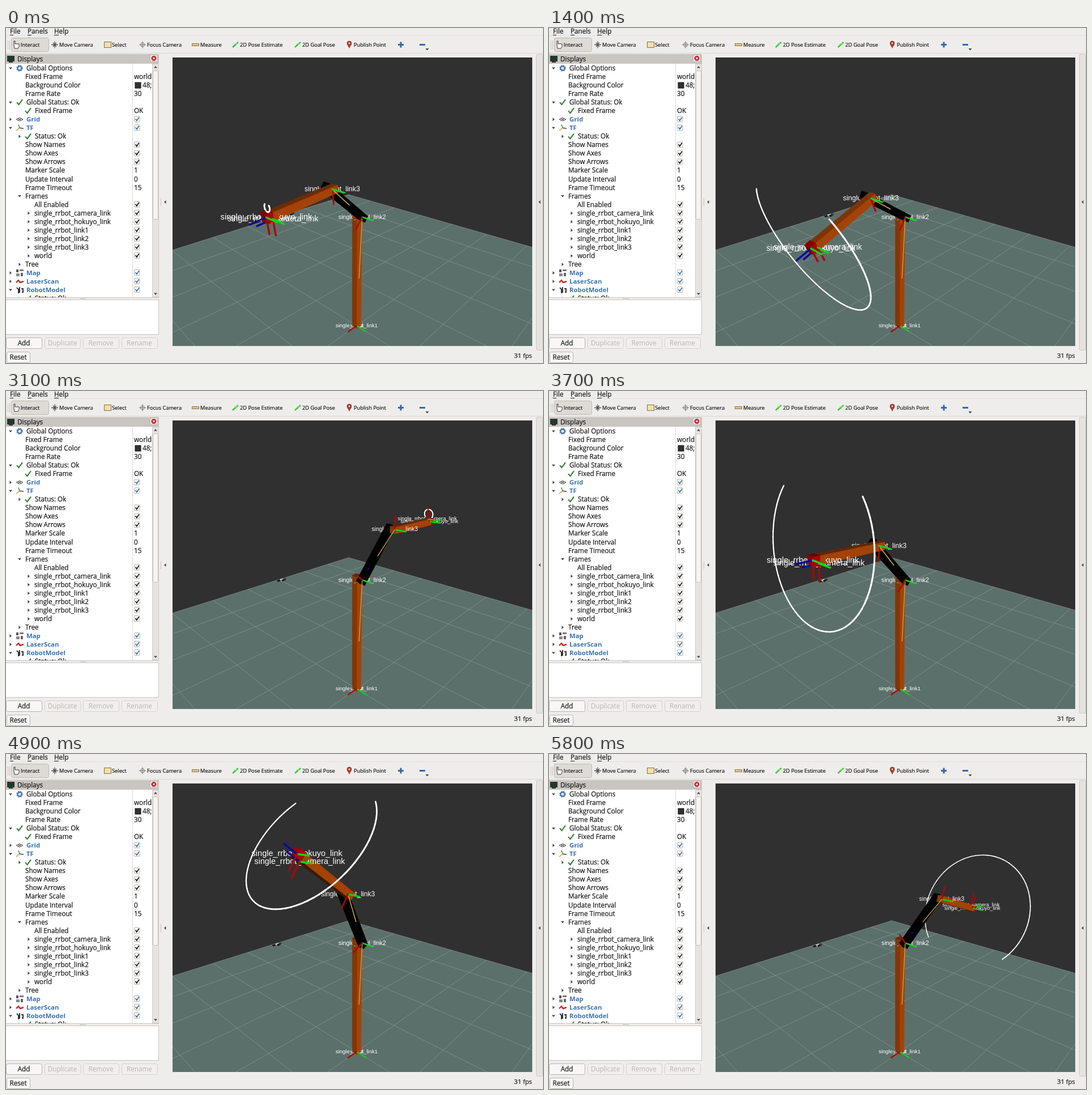
Write an HTML page with a canvas that moves like this. It is 948 px wide and 591 px high and loops after 5900 ms.

```html
<!DOCTYPE html>
<html lang="en">
<head>
<meta charset="utf-8">
<title>Robot arm view</title>
<style>
html, body { margin: 0; width: 100%; height: 100%; overflow: hidden; background: #efedeb; }
svg, canvas { position: absolute; display: block; }
svg { left: 0; top: 0; }
canvas { left: 294px; top: 52px; }
text { font-family: "Open Sans", "Noto Sans", sans-serif; font-size: 11.7px; fill: #141414; stroke: #141414; stroke-width: .2px; }
.tool { font-size: 9.3px; }
.name { font-size: 11.4px; font-weight: 700; fill: #3a74b4; stroke: none; }
.off { fill: #b9b5b0; stroke: none; }
</style>
</head>
<body>
<svg id="ui" width="948" height="591" viewBox="0 0 948 591"></svg>
<canvas id="view" width="635" height="509"></canvas>
<script>
// ---------- window chrome ----------
const text = (x, y, s, cls = '', extra = '') => `<text x="${x}" y="${y}" class="${cls}" ${extra}>${s}</text>`;
const rect = (x, y, w, h, fill, stroke = 'none', r = 0) =>
  `<rect x="${x}" y="${y}" width="${w}" height="${h}" rx="${r}" fill="${fill}" stroke="${stroke}"/>`;
const path = (d, stroke, w = 1.5, fill = 'none') =>
  `<path d="${d}" stroke="${stroke}" stroke-width="${w}" fill="${fill}"/>`;
const tri = (x, y, dir) => path({
  d: `M${x - 3} ${y - 1.5}h6l-3 3.5z`, r: `M${x - 1.5} ${y - 3}v6l3.5 -3z`,
  l: `M${x + 1.5} ${y - 3}v6l-3.5 -3z`, u: `M${x - 3} ${y + 1.5}h6l-3 -3.5z`
}[dir], 'none', 0, '#444');
const tick = (x, y) => path(`M${x - 5} ${y}l3.5 4l6.5 -9`, '#2c7d2c', 2);
const check = (y, blue) => rect(226.5, y - 5.5, 9.5, 10, '#fff', '#b5b0aa', 1.5) +
  path(`M228.5 ${y - 1}l2.3 3.2l4 -6`, blue ? '#3a74b4' : '#222', 1.8);

const icons = {
  'Global Options': y => `<circle cx="24" cy="${y}" r="3.6" fill="none" stroke="#4f7fb5" stroke-width="2.6"/>` +
    `<circle cx="24" cy="${y}" r="5" fill="none" stroke="#4f7fb5" stroke-width="1.5" stroke-dasharray="2 2"/>`,
  Grid: y => path(`M18 ${y}l6 -3l6 3l-6 3zM21 ${y - 1.5}l6 3M27 ${y - 1.5}l-6 3`, '#444', 1),
  TF: y => path(`M24 ${y}l-6 5`, '#c9a227') + path(`M24 ${y}l-2 -6`, '#3f8f3f') + path(`M24 ${y}l7 1`, '#445', 1.5),
  Map: y => rect(18, y - 6, 4, 5, '#555') + rect(24, y - 6, 7, 3, '#777') + rect(18, y + 1, 6, 5, '#888') + rect(26, y, 4, 6, '#666'),
  LaserScan: y => path(`M18 ${y + 2}l4 -4l3 4l6 -2`, '#c22', 2.4),
  RobotModel: y => path(`M19 ${y - 4}l3 3v7M24 ${y - 5}v10M27 ${y - 2}h3v6h-2`, '#333', 2)
};

// label, x, arrow, value ('c' and 'b' are check boxes, 't' a tick)
const link = n => ['single_rrbot_' + n, 50, 'r', 'c'];
const rows = [
  ['Global Options', 36, 'd'], ['Fixed Frame', 34, '', 'world'], ['Background Color', 34, '', '48;'],
  ['Frame Rate', 34, '', '30'], ['Global Status: Ok', 36, 'd', 't'], ['Fixed Frame', 51, '', 'OK'],
  ['Grid', 36, 'r', 'b'], ['TF', 36, 'd', 'b'], ['Status: Ok', 51, 'r', 't'],
  ['Show Names', 34, '', 'c'], ['Show Axes', 34, '', 'c'], ['Show Arrows', 34, '', 'c'],
  ['Marker Scale', 34, '', '1'], ['Update Interval', 34, '', '0'], ['Frame Timeout', 34, '', '15'],
  ['Frames', 34, 'd'], ['All Enabled', 50, '', 'c'],
  ...['camera_link', 'hokuyo_link', 'link1', 'link2', 'link3'].map(link), ['world', 50, 'r', 'c'],
  ['Tree', 34, 'r'], ['Map', 36, 'r', 'b'], ['LaserScan', 36, 'r', 'b'], ['RobotModel', 36, 'd', 'b'],
  ['Status: Ok', 51, 'r', 't']
];
const arrowX = { 34: 24, 36: 8, 50: 40, 51: 24 };

function row([label, x, arrow, val], i) {
  const y = 71 + i * 15.04, blue = val === 'b';
  let s = text(x, y + 4, label, blue ? 'name' : '');
  if (arrow) s += tri(arrowX[x], y, arrow);
  if (icons[label]) s += icons[label](y);
  if (val === 't' || val === 'OK') s += tick(x - 12, y);
  if (blue || val === 'c') s += check(y, blue);
  else if (val && val !== 't') {
    const swatch = val === '48;';
    if (swatch) s += rect(228, y - 5, 10, 10, '#303030', '#111');
    s += text(swatch ? 241 : 226, y + 4, val);
  }
  return s;
}

const button = (x, y, w, label, cls) => rect(x + .5, y + .5, w, 19, cls ? '#f1efed' : '#f8f7f6', cls ? '#d6d1cc' : '#b9b3ad', 3) +
  text(x + w / 2, y + 14, label, cls, 'text-anchor="middle"');
const pen = x => path(`M${x} 34l10 -9`, '#2fd02f', 2.5) + path(`M${x + 3} 28l6 0`, '#8be08b', 1.5);

document.getElementById('ui').innerHTML =
  rect(0, 0, 948, 591, '#efedeb') +
  text(7, 10, 'File') + text(38, 10, 'Panels') + text(85, 10, 'Help') +
  path('M7 12.5h6M38 12.5h7M85 12.5h8', '#222', 1) +
  path('M0 13.5h948', '#e2dfdb', 1) + path('M0 44.5h948', '#d8d4d0', 1) +
  path('M3.5 22v16M6.5 22v16', '#c5c0ba', 1) +
  rect(9.5, 17.5, 66, 24, '#dedbd7', '#bdb8b2', 3) +
  path('M14 30v-7h2v5h7v5l-2 3h-6z', '#333', 1, '#fff') +
  path('M80 29.5h12M86 23.5v12M83 26l6 7M89 26l-6 7', '#555', 1.3) +
  rect(173.5, 24.5, 12, 10, '#f1dfb0', '#8a6d3b') +
  path('M235 29.5h12M241 23.5v12', '#777', 1.2) + '<circle cx="241" cy="29.5" r="3.5" fill="none" stroke="#777"/>' +
  rect(328.5, 27.5, 12, 4, '#d9c58a', '#8a7a4a') +
  pen(400) + pen(510) +
  path('M606 35.5c-1 -4 -4 -5 -4 -8.5a4 4 0 0 1 8 0c0 3.5 -3 4.5 -4 8.5z', '#7d2018', .6, '#b03a2a') +
  '<circle cx="606" cy="27" r="1.4" fill="#efedeb"/>' +
  path('M692 29.5h10M697 24.5v10M730 29.5h10', '#3468b0', 3) + tri(743.5, 37.5, 'd') +
  [[26, 'Interact'], [94, 'Move Camera'], [187, 'Select'], [249, 'Focus Camera'], [343, 'Measure'],
   [413, '2D Pose Estimate'], [523, '2D Goal Pose'], [614, 'Publish Point']].map(([x, s]) => text(x, 33, s, 'tool')).join('') +
  rect(0, 46, 270, 17, '#c9c5c1') + rect(2.5, 49.5, 12, 9, '#1f3a2a', '#333') + rect(5, 59, 7, 2, '#333') + text(20, 59, 'Displays') +
  rect(254.5, 47.5, 13, 12, '#f3f0ee', '#b9a9a5', 3) + '<circle cx="261" cy="53.5" r="4.5" fill="#c8202a"/>' +
  path('M259.3 51.8l3.4 3.4M262.7 51.8l-3.4 3.4', '#fff', 1.2) +
  `<svg x="0" y="63" width="258" height="412" viewBox="0 63 258 412">${rect(0, 63, 258, 412, '#fff')}${path('M223.5 63v412', '#dcd9d6', 1)}${rows.map(row).join('')}</svg>` +
  rect(258.5, 63.5, 11, 411, '#e6e3e0', '#cfcac6') + rect(259.5, 75.5, 9, 262, '#f5f4f2', '#c4bfba', 2) +
  tri(264, 69, 'u') + tri(264, 469, 'd') + path('M0 475.5h270', '#c9c4bf', 1) +
  path('M130 477.5h11', '#bbb', 1) +
  rect(-.5, 479.5, 270, 61, '#fff', '#c9c4bf') +
  button(0, 546, 63, 'Add') + button(68, 546, 63, 'Duplicate', 'off') + button(136, 546, 63, 'Remove', 'off') + button(204, 546, 63, 'Rename', 'off') +
  button(1, 571, 41, 'Reset') + text(897, 582, '31 fps', '', 'style="font-size:11.2px"') +
  path('M273.5 300v14', '#c9c4bf', 1) + tri(281, 307, 'l') +
  rect(936.5, 46.5, 11, 522, '#e6e3df', '#cdc8c3', 2) + tri(942, 307, 'l');

// ---------- 3D view ----------
const g = document.getElementById('view').getContext('2d');
g.translate(-294, -52);
g.lineCap = 'round';
g.textAlign = 'center';
g.textBaseline = 'middle';

const CAM = [3.535, 3.243, 3.781], FOCAL = 614.4, COS = .9478, SIN = .319;
const HALF = 5.1, RAD = Math.PI / 180;
const LAG = .015; // the laser ring trails the arm, in s
const LIGHT = [.5, .7, .3];
const add = (a, b, k = 1) => a.map((v, i) => v + b[i] * k);
const dot = (a, b) => a[0] * b[0] + a[1] * b[1] + a[2] * b[2];

// world point -> [screen x, screen y, depth]
function project([x, y, z]) {
  const r = .07 - .6867 * x + .7269 * y, h = 4.797 - .7269 * x - .6867 * y, b = CAM[2] - z;
  const d = COS * h + SIN * b;
  return [611.5 + FOCAL * r / d, 306 + FOCAL * (COS * b - SIN * h) / d, d];
}

// time in s, swing phase of both joints in degrees
const swing = [[0, -301, -305], [1.4, 88, 72], [2.2, 319, 316], [3.1, 588, 598], [4.2, 919, 916], [4.9, 1107, 1109], [5.8, 1372, 1360]];
// time in s, radius of the laser ring in m
const ring = [[0, .05], [.1, .8], [.4, .92], [1.7, .9], [2, .7], [2.2, .13], [2.4, .9], [2.6, .9], [3.1, .08],
  [3.3, .7], [3.7, .9], [3.9, .9], [4.2, .18], [4.5, .9], [4.9, .86], [5.8, 1]];

function lerp(table, t, col = 1) {
  let i = 1;
  while (i < table.length - 1 && table[i][0] < t) i++;
  const a = table[i - 1], b = table[i];
  return a[col] + (b[col] - a[col]) * (t - a[0]) / (b[0] - a[0]);
}

const frame = (o, a) => ({ o, X: [Math.cos(a), 0, -Math.sin(a)], Y: [0, 1, 0], Z: [Math.sin(a), 0, Math.cos(a)] });
const at = (f, x, y, z) => add(add(add(f.o, f.X, x), f.Y, y), f.Z, z);

function pose(t) {
  const q = c => Math.sin(lerp(swing, t, c) * RAD);
  const l1 = frame([0, 0, 0], 0);
  const l2 = frame([0, .1, 1.95], q(1));
  const l3 = frame(at(l2, 0, .1, .9), q(1) + q(2));
  return { l1, l2, l3, camera: { ...l3, o: at(l3, .05, 0, .9) }, hokuyo: { ...l3, o: at(l3, 0, 0, .975) } };
}

let items;
const put = (depth, draw) => items.push({ depth, draw });

function poly(pts, fill, edge) {
  g.beginPath();
  pts.forEach(p => g.lineTo(p[0], p[1]));
  g.closePath();
  g.fillStyle = fill;
  g.fill();
  if (edge) { g.strokeStyle = fill; g.lineWidth = .6; g.stroke(); }
}

function line(a, b, color, width, bias = 0) {
  const p = project(a), q = project(b);
  put((p[2] + q[2]) / 2 - bias, () => {
    g.strokeStyle = color;
    g.lineWidth = width / p[2];
    g.beginPath();
    g.moveTo(p[0], p[1]);
    g.lineTo(q[0], q[1]);
    g.stroke();
  });
}

// box cut into slices along z, so that sorting by depth is enough
function box(f, z0, z1, half, rgb, n) {
  const step = (z1 - z0) / n;
  for (let i = 0; i < n; i++) {
    const a = z0 + i * step, b = a + step, m = (a + b) / 2;
    const sides = [[1, 0], [-1, 0], [0, 1], [0, -1]].map(([x, y]) => ({
      n: add(f.X.map(v => v * x), f.Y, y),
      c: at(f, x * half, y * half, m),
      p: [[1, a], [-1, a], [-1, b], [1, b]].map(([s, z]) => at(f, (x + s * y) * half, (y + s * x) * half, z))
    }));
    const cap = (z, k) => ({
      n: f.Z.map(v => v * k), c: at(f, 0, 0, z),
      p: [[1, 1], [1, -1], [-1, -1], [-1, 1]].map(([x, y]) => at(f, x * half, y * half, z))
    });
    if (i === 0) sides.push(cap(a, -1));
    if (i === n - 1) sides.push(cap(b, 1));
    put(project(at(f, 0, 0, m))[2], () => {
      for (const s of sides) {
        if (dot(s.n, add(CAM, s.c, -1)) <= 0) continue;
        const k = .32 + .95 * Math.max(0, dot(s.n, LIGHT));
        poly(s.p.map(project), `rgb(${rgb.map(v => Math.round(v * k))})`, true);
      }
    });
  }
}

function axes(f) {
  const w = 13;
  line(f.o, at(f, .2, 0, 0), '#a80808', w, .08);
  line(f.o, at(f, 0, .2, 0), '#12d416', w, .02);
  line(f.o, at(f, 0, 0, .2), '#0a0a9c', w, -.02);
}

function label(f, s) {
  const [x, y, d] = project(f.o);
  put(d + .08, () => {
    g.font = `${54.3 / d}px "Liberation Sans", Arial, sans-serif`;
    g.fillStyle = '#fff';
    g.fillText(s, x, y);
  });
}

function arrow(from, to) {
  line(from, add(from, add(to, from, -1), .53), '#c4a84a', 7, .2);
}

function ground(t) {
  g.fillStyle = '#303030';
  g.fillRect(294, 52, 635, 509);
  const l = project([HALF, -HALF, 0]), r = project([-HALF, HALF, 0]);
  poly([project([-HALF, -HALF, 0]), l, [l[0], 800], [r[0], 800], r], '#5c706b');
  g.strokeStyle = 'rgba(160,164,164,.5)';
  g.lineWidth = 1;
  g.beginPath();
  for (let i = -5; i <= 5; i++) {
    const c = i * HALF / 5;
    for (const p of [u => [u, c, 0], u => [c, u, 0]]) {
      const a = project(p(-HALF)), d = project(p(HALF))[2];
      const k = d > .4 ? 1 : (a[2] - .4) / (a[2] - d);
      const b = project(p(-HALF + 2 * HALF * k));
      g.moveTo(a[0], a[1]);
      g.lineTo(b[0], b[1]);
    }
  }
  g.stroke();
  // small flat marker creeping over the floor
  const x = 501 - 4.6 * t, y = 326.5 + 1.6 * t;
  const quad = (dx, dy, w, fill) => poly([[x + dx, y + dy], [x + dx + w, y + dy - 2], [x + dx + w + 3, y + dy], [x + dx + 3, y + dy + 2.5]], fill);
  quad(-9, 3, 5, '#1a1a1a');
  quad(-4, 1, 6, '#c9cdca');
  quad(-1, 2, 5, '#151515');
  quad(2, 0, 4, '#30383a');
}

function scan(t) {
  const f = pose(t - LAG).hokuyo, rad = lerp(ring, t), n = 60;
  const pt = i => {
    const a = (i / n * 2 - 1) * 131 * RAD;
    return at(f, rad * Math.cos(a), rad * Math.sin(a), 0);
  };
  for (let i = 0; i < n; i++) line(pt(i), pt(i + 1), '#fff', 9.5);
}

function render(t) {
  items = [];
  const p = pose(t), orange = [165, 68, 8];
  ground(t);
  box(p.l1, 0, 2, .05, orange, 20);
  box(p.l2, -.05, .95, .05, [3, 3, 3], 10);
  box(p.l3, -.05, .95, .05, orange, 10);
  box(p.l3, .92, 1, .054, [175, 4, 4], 1);
  Object.values(p).forEach(axes);
  arrow(p.l2.o, p.l1.o);
  arrow(p.l3.o, p.l2.o);
  label(p.l1, 'world');
  label(p.l1, 'single_rrbot_link1');
  label(p.l2, 'single_rrbot_link2');
  label(p.l3, 'single_rrbot_link3');
  label(p.camera, 'single_rrbot_camera_link');
  label(p.hokuyo, 'single_rrbot_hokuyo_link');
  scan(t);
  items.sort((a, b) => b.depth - a.depth).forEach(i => i.draw());
}

let last = -1;
const start = performance.now();
function play() {
  let step = Math.floor((performance.now() - start) % 5900 / 100);
  if (step === 26) step = 25; // the picture rests for one beat here
  if (step !== last) render((last = step) / 10);
  requestAnimationFrame(play);
}
play();
</script>
</body>
</html>
```
